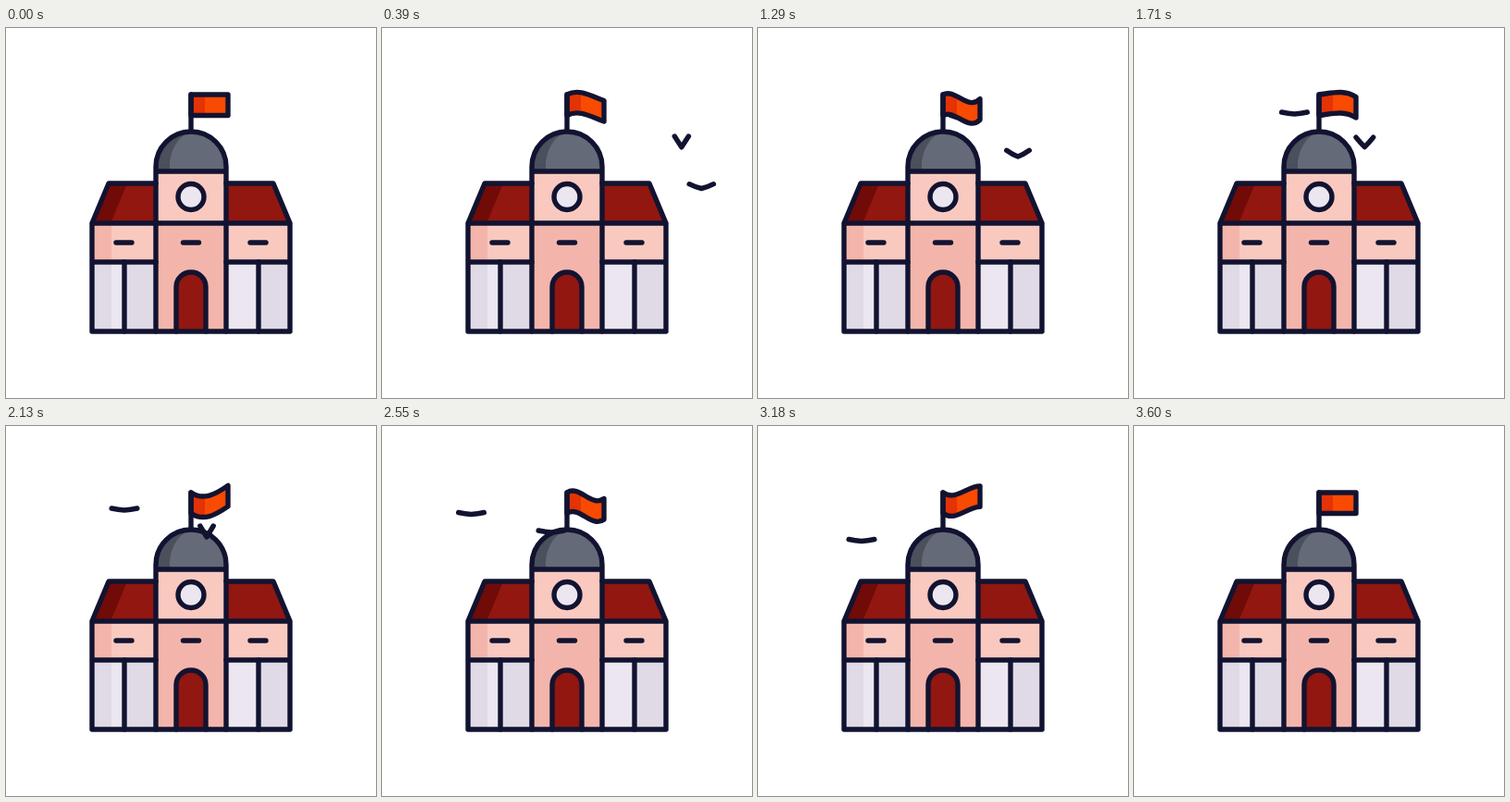
Recreate the animation shown at these times as an HTML page. Size 400 by 400 pixels, loop 8 s.

```html
<!DOCTYPE html>
<html lang="en">
<head>
<meta charset="utf-8">
<title>Town hall</title>
<style>
  html, body { margin: 0; width: 100%; height: 100%; overflow: hidden; background: #fff; }
  svg { display: block; width: 100vw; height: 100vh; }
  .ink { fill: none; stroke: #121331; stroke-width: 5.4; stroke-linecap: round; stroke-linejoin: round; }
</style>
</head>
<body>
<svg viewBox="0 0 400 400">
  <path id="bird-high" class="ink"/>

  <clipPath id="flag-clip"><path id="flag-area"/></clipPath>
  <g clip-path="url(#flag-clip)">
    <path fill="#f94a02" d="M198 50h50v70h-50z"/>
    <path fill="#e43305" d="M198 50h17v70h-17z"/>
  </g>
  <path id="flag-line" class="ink"/>
  <path class="ink" d="M200 72V110"/>

  <path fill="#911710" d="M111 168H289L307 211H93z"/>
  <path fill="#700b08" d="M111 168H131L113 211H93z"/>
  <path fill="#f9c9c0" d="M93 211H307V253H93zM162 155H238V211H162z"/>
  <path fill="#f3b5ab" d="M93 211H114V253H93zM162 211H238V328H162z"/>
  <path fill="#ebe6ef" d="M93 253H162V328H93zM238 253H307V328H238z"/>
  <path fill="#e0dae6" d="M93 253H114V328H93zM128 253H162V328H128zM273 253H307V328H273z"/>
  <path fill="#646a78" d="M162 155V150a38 38 0 0 1 76 0V155z"/>
  <path fill="#4a505c" d="M162 155V150a38 38 0 0 1 38 -38C186 117 177 132 177 150V155z"/>
  <path fill="#911710" d="M184 328V280a16 16 0 0 1 32 0V328z"/>
  <circle class="ink" style="fill:#ebe6ef" cx="200" cy="182.5" r="14"/>
  <g class="ink">
    <path d="M162 168H111L93 211M238 168H289L307 211M93 211H307V328H93zM93 253H162M238 253H307"/>
    <path d="M162 328V150a38 38 0 0 1 76 0V328M162 155H238M128 253V328M273 253V328"/>
    <path d="M184 328V280a16 16 0 0 1 32 0V328M119 232H136M191.500 232H208.500M264 232H281"/>
  </g>

  <path id="bird-low" class="ink"/>
</svg>
<script>
const LOOP = 8000, ACTIVE = 3600, STEP = 30, FLAP = 372;
const el = id => document.getElementById(id);
const clamp = v => Math.max(0, Math.min(1, v));
const smooth = v => { v = clamp(v); return v * v * (3 - 2 * v); };
const TAU = Math.PI * 2;

// Waypoints are [time, x, y of the body].
const birds = [
  { node: el('bird-high'), peak: 780, glide: 2082, path: [
    [60, 358, 143], [780, 282.5, 113], [1290, 222, 98], [2130, 128, 91], [2550, 96.500, 95.5], [2940, 78, 102]] },
  { node: el('bird-low'), peak: 1014, glide: 2316, path: [
    [240, 356, 180], [780, 317.5, 157], [1290, 281, 139], [2130, 217, 120], [2550, 183, 115], [3180, 112, 124.5], [3570, 68, 138]] }
];

// Cubic Hermite interpolation between unevenly spaced waypoints.
function along(path, t) {
  let i = 0;
  while (i < path.length - 2 && t > path[i + 1][0]) i++;
  const a = path[i], b = path[i + 1], span = b[0] - a[0], u = clamp((t - a[0]) / span);
  const slope = (k, n) => {
    const p = path[Math.max(0, n - 1)], q = path[Math.min(path.length - 1, n + 1)];
    return (q[k] - p[k]) / (q[0] - p[0]) * span;
  };
  return [1, 2].map(k =>
    a[k] + (b[k] - a[k]) * u * u * (3 - 2 * u) +
    slope(k, i) * u * (1 - u) ** 2 - slope(k, i + 1) * u * u * (1 - u));
}

function drawBird({ node, peak, glide, path }, t) {
  const start = path[0][0], end = path[path.length - 1][0];
  const visible = t > start && t < end;
  node.style.display = visible ? '' : 'none';
  if (!visible) return;
  const size = smooth((t - start) / 150) * smooth((end - t) / 150);
  const lift = t > glide ? 0 : (1 + Math.cos(TAU * (t - peak) / FLAP)) / 2;
  const d = (2 + 10 * lift) * size;
  const w = Math.sqrt(14 * 14 * size * size - d * d);
  const bend = d * (0.2 + 0.3 * lift);
  const [x, y] = along(path, t);
  node.setAttribute('d',
    `M${x - w} ${y - d}Q${x - w / 2} ${y - bend} ${x} ${y}Q${x + w / 2} ${y - bend} ${x + w} ${y - d}`);
}

function drawFlag(t) {
  const p = t / 1200;
  const amount = smooth(t / 300) * smooth((ACTIVE - t) / 300);
  const near = -10 * amount * Math.sin(TAU * (p + 0.05));
  const far = amount * (4 + 14 * Math.cos(TAU * (p - 0.05)));
  const tip = 8 * amount * Math.sin(TAU * p + 0.16);
  const top = 72, bottom = 94.5;
  const d = `M200 ${top}C213.3 ${top + near} 226.7 ${top + far} 240 ${top + tip}` +
    `V${bottom + tip}C226.7 ${bottom + far} 213.3 ${bottom + near} 200 ${bottom}Z`;
  el('flag-area').setAttribute('d', d);
  el('flag-line').setAttribute('d', d);
}

function render(time) {
  const t = Math.min(ACTIVE, Math.floor(time % LOOP / STEP) * STEP);
  drawFlag(t);
  birds.forEach(bird => drawBird(bird, t));
}

const begin = performance.now();
function tick() {
  render(performance.now() - begin);
  requestAnimationFrame(tick);
}
tick();
</script>
</body>
</html>
```
